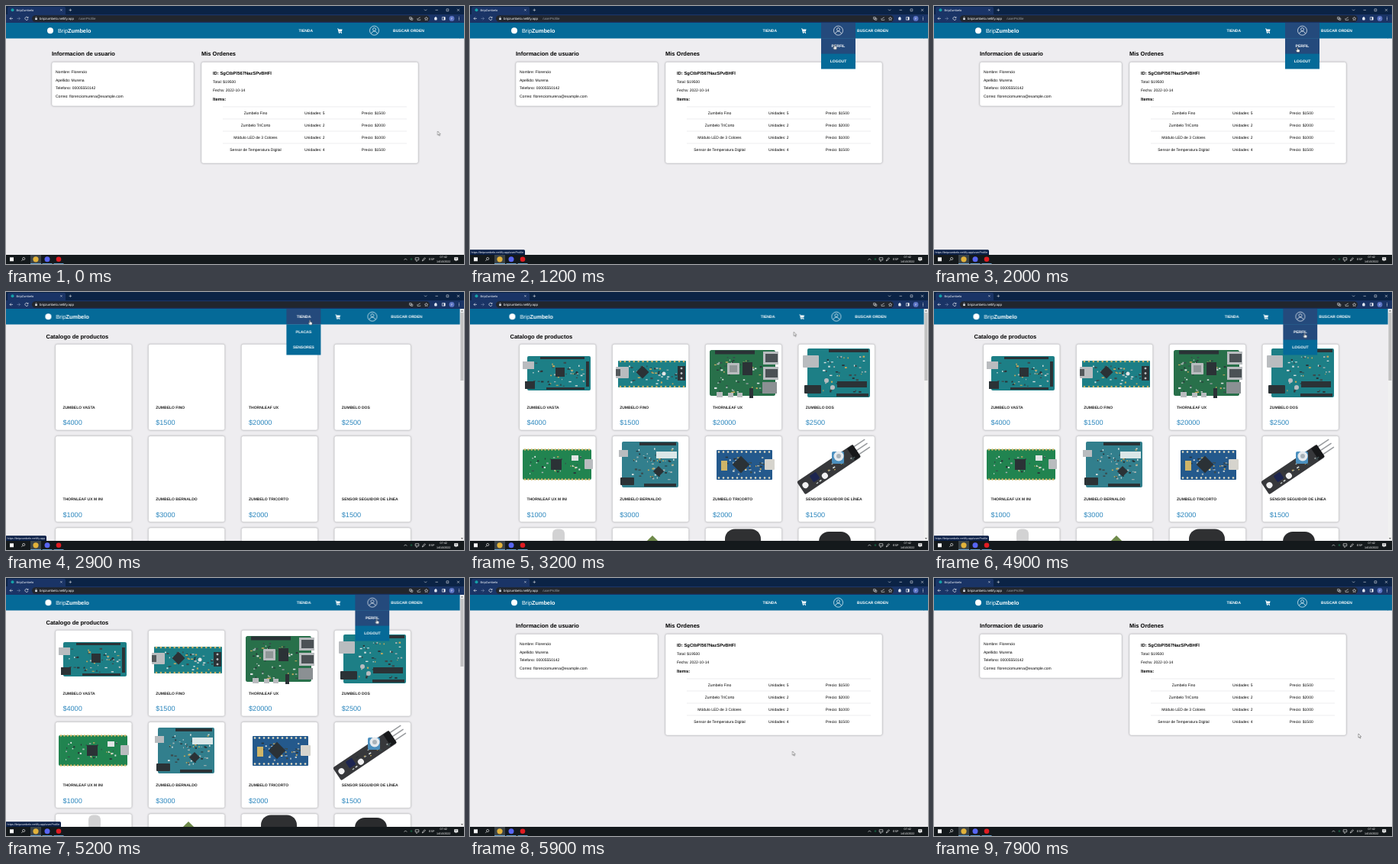
An HTML page that plays this animation: 600 px wide and 338 px high, repeating every 8 s.

```html
<!DOCTYPE html>
<html lang="es">
<head>
<meta charset="utf-8">
<title>BripZumbelo</title>
<style>
html, body { margin: 0; width: 100%; height: 100%; overflow: hidden; background: #eeedf0; }
svg { display: block; width: 600px; height: 338px; font: 5px "Liberation Sans", Arial, sans-serif; text-rendering: geometricPrecision; }
.b { font-weight: 700; }
.mid { text-anchor: middle; }
.h { font-size: 7.5px; font-weight: 700; }
.sub { font-size: 5.85px; font-weight: 700; }
.card { fill: #fff; stroke: #c9c9cd; stroke-width: .5; filter: drop-shadow(0 0 1.2px #0004); }
.price { font-size: 9.15px; fill: #2b86bd; }
.line { fill: none; stroke: #fff; }

/* hard switches over the 8 s loop */
.profile, .store, .photos, .nav, .user, .user-hot, .shop, .tip-user, .tip-home, .arrow, .hand { animation: 8s step-end infinite; }
.profile  { animation-name: profile; }
.store    { animation-name: store; }
.photos   { animation-name: photos; }
.nav      { animation-name: nav; }
.user     { animation-name: user; }
.user-hot { animation-name: user-hot; }
.shop     { animation-name: shop; }
.tip-user { animation-name: tip-user; }
.tip-home { animation-name: tip-home; }
.arrow    { animation-name: arrow; }
.hand     { animation-name: hand; }
.cursor   { animation: move 8s linear infinite; }

@keyframes profile  { 0%, 66.25% { opacity: 1 } 35% { opacity: 0 } }
@keyframes store    { 0%, 66.25% { opacity: 0 } 35% { opacity: 1 } }
@keyframes photos   { 0% { opacity: 0 } 38.75% { opacity: 1 } }
@keyframes nav      { 0%, 66.25% { transform: none } 35% { transform: translateX(-2.6px) } }
@keyframes user     { 0%, 27.5%, 68% { opacity: 0 } 9.4%, 55.6% { opacity: 1 } }
@keyframes user-hot { 0%, 27%, 68% { opacity: 0 } 12.5%, 58.5% { opacity: 1 } }
@keyframes shop     { 0%, 39.4% { opacity: 0 } 30.3% { opacity: 1 } }
@keyframes tip-user { 0%, 28%, 69.4% { opacity: 0 } 13%, 59.2% { opacity: 1 } }
@keyframes tip-home { 0%, 40% { opacity: 0 } 31% { opacity: 1 } }
@keyframes arrow    { 0%, 27.5%, 39.4%, 68% { opacity: 1 } 9.4%, 30.3%, 55.6% { opacity: 0 } }
@keyframes hand     { 0%, 27.5%, 39.4%, 68% { opacity: 0 } 9.4%, 30.3%, 55.6% { opacity: 1 } }
@keyframes move {
  0%, 2.5%       { transform: translate(565.5px, 164px) }
  6.2%           { transform: translate(541px, 92px) }
  10%            { transform: translate(484px, 32px) }
  16%, 26.2%     { transform: translate(476px, 54px) }
  29%            { transform: translate(440px, 44px) }
  32%, 38%       { transform: translate(398px, 36.5px) }
  42%            { transform: translate(450px, 68px) }
  47%, 48.5%     { transform: translate(519px, 60.5px) }
  52%            { transform: translate(536px, 56px) }
  56.2%          { transform: translate(490px, 34px) }
  60%, 66.5%     { transform: translate(485.5px, 53.5px) }
  69%            { transform: translate(462px, 115px) }
  73.5%, 75%     { transform: translate(422.5px, 227px) }
  80%            { transform: translate(426px, 239px) }
  85%            { transform: translate(478px, 236px) }
  91%            { transform: translate(549px, 222px) }
  95%, 100%      { transform: translate(556px, 204px) }
}
</style>
</head>
<body>
<svg id="stage" viewBox="0 0 600 338"></svg>
<script>
const SITE = "bripzumbelo.netlify.app";
const SILVER = "#b9bcbf", BLACK = "#2b3236", TEAL = "#1d7f86", GOLD = "#cfb568";

const rect = (x, y, w, h, fill, rx = 0) =>
  `<rect x="${x}" y="${y}" width="${w}" height="${h}" rx="${rx}" fill="${fill}"/>`;
const dot = (x, y, r, fill) => `<circle cx="${x}" cy="${y}" r="${r}" fill="${fill}"/>`;
const card = (x, y, w, h) => `<rect class="card" x="${x}" y="${y}" width="${w}" height="${h}" rx="2.5"/>`;
const text = (x, y, s, cls = "", attr = "") => `<text x="${x}" y="${y}" class="${cls}" ${attr}>${s}</text>`;
const group = (cls, ...parts) => `<g class="${cls}">${parts.join("")}</g>`;
const line = (d, width = .6, color = "#fff") =>
  `<path class="line" d="${d}" style="stroke:${color};stroke-width:${width}"/>`;
const tilt = (angle, x, y, body) => `<g transform="rotate(${angle} ${x} ${y})">${body}</g>`;
const repeat = (n, fn) => Array.from({ length: n }, (_, i) => fn(i)).join("");

const pins = (x, y, w, n, fill = GOLD) =>
  repeat(n, i => dot(x + i * w / (n - 1), y, 1.3, fill));

// small seeded scatter of surface parts
function parts(x, y, w, h, n, seed) {
  const rnd = () => (seed = (seed * 16807) % 2147483647) / 2147483647;
  const tones = ["#d9e1df", "#2a3438", "#a8b4b3", "#3a4a4c", "#c4a95d"];
  return repeat(n, i => rect(x + rnd() * w, y + rnd() * h, 1 + rnd() * 2.5, 1 + rnd() * 1.2, tones[i % 5]));
}

function profilePage() {
  const user = ["Nombre: Florencio", "Apellido: Murena", "Telefono: 00005550142", "Correo: florenciomurena@example.com"];
  const items = [["Zumbelo Fino", 5, 1500], ["Zumbelo TriCorto", 2, 2000],
    ["Módulo LED de 3 Colores", 2, 1000], ["Sensor de Temperatura Digital", 4, 1500]];
  return group("profile",
    text(60, 65.4, "Informacion de usuario", "h"),
    text(256, 65.4, "Mis Ordenes", "h"),
    card(60, 73.5, 186, 57.5), card(256, 73.5, 284, 132.5),
    ...user.map((s, i) => text(65, 87.9 + i * 10.65, s)),
    text(271, 89.6, "ID: SgCtbPl567NazSPvBHFl", "sub"),
    text(271, 101.4, "Total: $19500"),
    text(271, 112, "Fecha: 2022-10-14"),
    text(271, 124.4, "Items:", "sub"),
    ...items.map(([name, n, cost], i) => {
      const y = 132 + i * 16;
      return rect(284, y - .25, 241, .5, "#d9dcdf") + text(327, y + 9.8, name, "mid") +
        text(404.3, y + 9.8, "Unidades: " + n, "mid") + text(481.3, y + 9.8, "Precio: $" + cost, "mid");
    }));
}

function photos() {
  const mega = rect(75, 84, 83, 45, TEAL, 2) + parts(82, 91, 66, 32, 50, 11) +
    rect(69, 91, 15, 10, SILVER) + rect(72, 117, 13, 10, BLACK) + rect(112, 99, 12, 12, BLACK) +
    rect(92, 85, 58, 3, BLACK) + rect(100, 125, 50, 3, BLACK) + rect(152, 91, 4, 33, BLACK);
  const nano = rect(194, 90, 89, 35, TEAL, 1) + parts(208, 96, 62, 24, 40, 23) +
    pins(197, 91, 83, 15) + pins(197, 124, 83, 15) + rect(191, 98, 17, 15, SILVER, 1) + rect(191, 101, 6, 9, "#54595c") +
    tilt(45, 226, 105, rect(220, 99, 12, 12, BLACK)) + dot(254, 107, 2.5, "#e4e7e7") + rect(272, 97, 10, 19, BLACK) +
    pins(277, 100, 0.01, 2, SILVER) + pins(277, 106.5, 0.01, 2, SILVER) + pins(277, 113, 0.01, 2, SILVER);
  const berry = rect(314, 76, 86, 60, "#28704a", 2.5) + parts(320, 85, 60, 46, 60, 37) +
    rect(321, 76.5, 52, 5, BLACK) + rect(337, 93, 16, 15, SILVER, 1) + rect(340, 96, 10, 9, "#8f9697") + rect(357, 92, 13, 17, BLACK) +
    rect(384, 78, 20, 17, SILVER) + rect(387, 81, 16, 11, "#4b5155") +
    rect(384, 98, 20, 17, SILVER) + rect(387, 101, 16, 11, "#4b5155") + rect(383, 118, 19, 15, "#8b9093") +
    rect(323, 131, 8, 7, SILVER) + rect(338, 132, 7, 6, SILVER) + rect(350, 132, 7, 6, SILVER) + rect(366, 126, 5, 13, BLACK);
  const uno = rect(442, 74, 82, 64, TEAL, 2) + parts(462, 83, 56, 48, 50, 41) +
    rect(436, 83, 21, 16, SILVER, 1) + rect(438, 122, 22, 11, BLACK, 1) + rect(470, 75, 52, 4, BLACK) +
    rect(480, 133, 42, 4, BLACK) + rect(481, 117, 39, 8, BLACK) + dot(467, 116, 3, SILVER) + dot(475, 125, 3, SILVER);
  const mini = rect(69, 206, 90, 40, "#218450", 2) + parts(78, 213, 68, 25, 36, 53) +
    pins(72, 206.5, 84, 20) + pins(72, 245.5, 84, 20) + rect(106, 219, 14, 14, BLACK) +
    rect(133, 214, 9, 7, "#e2e4e4") + rect(150, 219, 11, 13, SILVER, 1);
  const leo = rect(199, 196, 74, 60, "#327f8d", 2) + parts(212, 204, 54, 42, 60, 67) +
    rect(195, 207, 12, 9, SILVER) + rect(197, 243, 18, 10, BLACK, 1) + rect(222, 197, 48, 4, BLACK) +
    rect(228, 251, 42, 4, BLACK) + tilt(45, 247, 235, rect(242, 230, 10, 10, BLACK)) + rect(244, 209, 27, 9, "#dbe7e8");
  const pro = rect(323, 207, 73, 39, "#24598c", 1) + parts(332, 214, 52, 24, 36, 71) +
    pins(326, 209.5, 66, 12, "#e8dfc4") + pins(326, 243.5, 66, 12, "#e8dfc4") +
    tilt(45, 355, 226, rect(347, 218, 16, 16, BLACK)) + rect(329, 221, 8, 13, GOLD) + rect(386, 219, 13, 14, "#d6d4cd", 1);
  const tracker = tilt(-34, 474, 231,
    repeat(3, i => rect(513, 223 + i * 6, 18, 1.5, "#96999c")) +
    rect(426, 220, 88, 20, "#37383b", 2) + rect(505, 221, 9, 18, "#17181a") + parts(446, 223, 58, 14, 24, 83) +
    dot(433, 230, 4, "#f2f2f3") + dot(461, 234, 4, "#f2f2f3") + rect(444, 223, 10, 10, "#1d2550", 1)) +
    rect(474, 209, 16, 16, "#4b8fbe", 2) + dot(483, 215, 6.5, "#e6eaee") + dot(483, 215, 3, "#a9b3ba");
  const rest = rect(108, 310.5, 16, 20, "#d2d2d3", 6) + tilt(45, 239, 326, rect(234, 321, 10, 10, "#6f8a4a")) +
    rect(334, 310.5, 47, 30, "#2f3032", 13) + rect(457, 314, 42, 30, "#2a2b2d", 13);
  return group("photos", mega, nano, berry, uno, mini, leo, pro, tracker, rest);
}

function storePage() {
  const goods = [["ZUMBELO VASTA", 4000], ["ZUMBELO FINO", 1500], ["THORNLEAF UX", 20000], ["ZUMBELO DOS", 2500],
    ["THORNLEAF UX M INI", 1000], ["ZUMBELO BERNALDO", 3000], ["ZUMBELO TRICORTO", 2000], ["SENSOR SEGUIDOR DE LÍNEA", 1500]];
  const spot = i => [64.8 + (i % 4) * 121.8, 68.4 + Math.floor(i / 4) * 120.3];
  return group("store",
    text(52.5, 60.6, "Catalogo de productos", "h"),
    repeat(12, i => card(...spot(i), 100, 112.5)),
    ...goods.map(([name, cost], i) => {
      const [x, y] = spot(i);
      return text(x + 9.6, y + 84.6, name, "b", 'fill="#222"') + text(x + 9.6, y + 105.8, "$" + cost, "price");
    }),
    photos(),
    rect(594.6, 22, 5.4, 304, "#f1f1f1"), rect(595.4, 27, 4, 89, "#c1c1c1"),
    `<path d="M596 25.5l1.4-2 1.4 2zM596 322l1.4 2 1.4-2z" fill="#666"/>`);
}

function navBar() {
  const HOT = "#244a7c", COOL = "#056a98";
  const label = (x, y, s) => text(x, y, s, "b mid", 'fill="#fff"');
  const menu = (x, first, second) =>
    label(x, 54.1, first) + label(x, 74.1, second);
  return rect(0, 22, 594.6, 20.5, COOL) + group("profile", rect(594, 22, 6, 20.5, COOL)) + group("nav",
    group("shop", rect(370, 22, 45, 20.5, HOT), rect(370, 42.5, 45, 40, COOL), menu(392.5, "PLACAS", "SENSORES")),
    group("user", rect(460, 22, 45, 20.5, HOT), rect(460, 42.5, 45, 40, COOL),
      group("user-hot", rect(460, 42.4, 45, 20.2, HOT)), menu(482.5, "PERFIL", "LOGOUT")),
    dot(58, 32.2, 4, "#fff"),
    `<text x="68" y="34.9" font-size="7.3" fill="#fff">Brip<tspan class="b">Zumbelo</tspan></text>`,
    label(392.8, 34, "TIENDA"), label(527.5, 34, "BUSCAR ORDEN"),
    `<path d="M434 29.5h1.4l.3 1h4.9l-.8 3h-3.5l.2.7h3.3v.7h-4l-1.1-4.7H434z" fill="#fff"/>`,
    dot(436.7, 35.2, .7, "#fff"), dot(439.4, 35.2, .7, "#fff"),
    line("M476.5 32.2a6 6 0 1 0 12 0a6 6 0 1 0-12 0M480.5 30.6a2 2 0 1 0 4 0a2 2 0 1 0-4 0M478.7 36.2c.5-4 7.1-4 7.6 0", .7));
}

function tip(cls, w, path) {
  return group(cls, `<path d="M0 319.2h${w - 1.5}q1.5 0 1.5 1.5v5.3H0z" fill="#0b1f46"/>`,
    text(1.5, 323.9, "https://" + SITE + path, "", 'font-size="3.75" fill="#e9edf5"'));
}

function browser() {
  return rect(0, 0, 600, 11, "#0b2345") + rect(2, 1, 76, 12, "#1a3466", 2) + rect(0, 11, 600, 11, "#1a3466") +
    dot(8.5, 5.3, 2, "#16a0a8") + text(13.5, 6.9, "BripZumbelo", "", 'font-size="4" fill="#f2f5fa"') +
    line("M71.3 4.2l2.2 2.2m0-2.2l-2.2 2.2M82.5 5.3h3.6m-1.8-1.8v3.6M548 4.5l1.6 1.6 1.6-1.6M562.5 5.3h3.4M577 3.9h2.8v2.8H577zM591 3.8l3 3m0-3l-3 3", .5) +
    line("M9 16.4H5m1.8-1.8L5 16.4l1.8 1.8M28.6 15a2.1 2.1 0 1 0 .4 1.9M29 14v1.6h-1.6") +
    line("M14.5 16.4h4m-1.8-1.8l1.8 1.8-1.8 1.8", .6, "#8093b5") +
    rect(34, 12.3, 521, 8.4, "#22262d", 4.2) +
    rect(38.2, 16, 2.6, 2.1, "#dfe5ef") + line("M38.8 16v-.8a.7.7 0 0 1 1.4 0v.8", .5) +
    text(44, 18, SITE, "", 'font-size="4.4" fill="#fff"') +
    group("profile", text(95.2, 18, "/userProfile", "", 'font-size="4.4" fill="#9aa0a6"')) +
    line("M528.5 14.6h2.6v2.6h-2.6zM530.4 16h2.4v2.4h-2.4zM539 16v2.4h3.8v-1M540 17q.5-2 2.8-2M550.6 14.4l.7 1.4 1.5.2-1.1 1.1.3 1.5-1.4-.7-1.4.7.3-1.5-1.1-1.1 1.5-.2z", .5) +
    rect(561.2, 15, 3.4, 3.4, "#e3e9f4", .7) + dot(563, 14.8, .8, "#e3e9f4") +
    line("M571.4 14.6h3.8v3.6h-3.8z") + rect(573.6, 14.6, 1.6, 3.6, "#fff") +
    dot(584, 16.4, 3.4, "#5c74c4") + text(584, 17.8, "F", "mid", 'font-size="3.6" fill="#fff"') +
    repeat(3, i => dot(593.5, 14.8 + i * 1.6, .5, "#fff"));
}

function taskbar() {
  const small = 'font-size="3.7" fill="#fff"';
  const BAR = "#14191c";
  return rect(0, 326, 600, 12, BAR) + rect(32, 326, 14, 12, "#3b4347") +
    [[32, 14], [47.5, 13], [62.5, 13]].map(([x, w]) => rect(x, 337.2, w, .8, "#76b9ed")).join("") +
    rect(5, 329.3, 5, 5, "#fff") + dot(39, 331.8, 3.6, "#e2b23a") + dot(54, 331.8, 3.5, "#5865f2") + dot(69, 331.8, 3.3, "#e01c22") +
    line("M21.6 331a1.6 1.6 0 1 0 3.2 0a1.6 1.6 0 1 0-3.2 0M22 332.2l-1.8 1.9M521.6 332.7l1.8-1.8 1.8 1.8M536.2 329.8h4.6v3h-4.6zM537 334.2h2M545.3 334l.6-1.7 2.6-2.5 1 1-2.6 2.5z") +
    dot(531, 331.7, 1.4, "#174f38") +
    text(557.7, 333.1, "ESP", "mid", small) + text(573.2, 330.4, "07:42", "mid", small) + text(573.2, 336, "14/10/2022", "mid", small) +
    `<path d="M587.2 329.2h5v4h-2l-1.2 1.4v-1.4h-1.8z" fill="#fff"/>` + line("M588.2 330.6h3m-3 1.2h3", .4, BAR);
}

const cursor = group("cursor",
  `<path class="arrow" d="M0 0v5.2l1.2-1.1.9 2 .9-.4-.9-1.9h1.6z" fill="#fff" stroke="#222" stroke-width=".4"/>`,
  `<path class="hand" d="M-.5 .5q.6-.7 1.1 0v2.2l2 .5q.7.3.6 1l-.5 2.4h-3L-2 4.2q.1-.8 1.5.1z" fill="#fff" stroke="#222" stroke-width=".4"/>`);

document.getElementById("stage").innerHTML = rect(0, 0, 600, 338, "#eeedf0") + profilePage() + storePage() +
  navBar() + tip("tip-user", 72, "/userProfile") + tip("tip-home", 53, "") + browser() + taskbar() + cursor;
</script>
</body>
</html>
```
